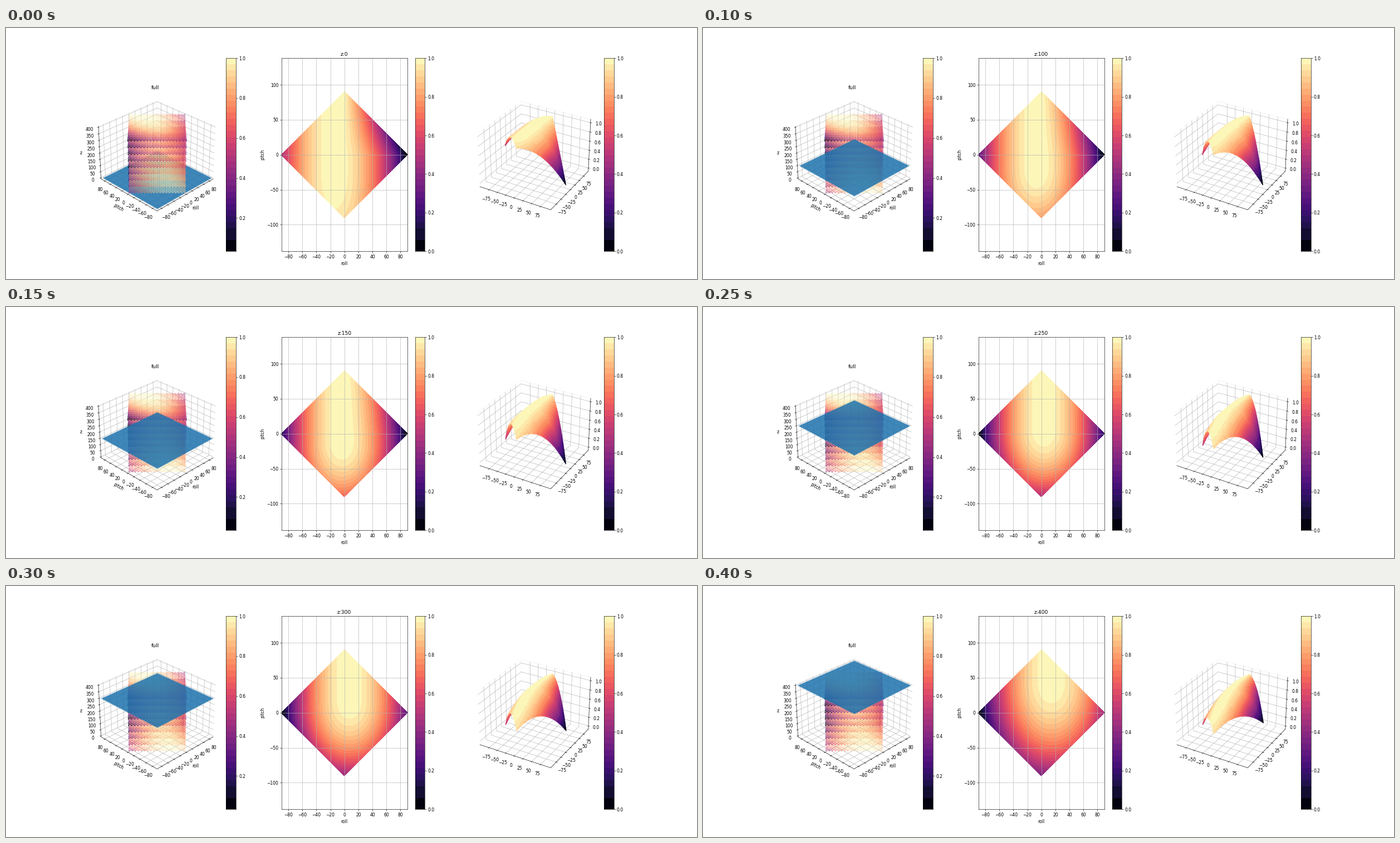
Recreate the animation shown at these times as a matplotlib script. Size 1241 px wide and 451 px high, loop 0.45 s.

```python
import numpy as np
import matplotlib.pyplot as plt
from matplotlib.animation import FuncAnimation
from matplotlib.colors import BoundaryNorm, ListedColormap
from mpl_toolkits.mplot3d.art3d import Poly3DCollection

WIDTH, HEIGHT, DPI = 1241, 451, 55
LIMIT = 90
LEVELS = np.arange(0, 401, 50)
LOWEST = 0.033  # lower end of the first colour scale

# Colour bands: two wide dark ones, then even steps up to 1.
EDGES = np.concatenate([[0, 0.06], np.linspace(0.12, 1, 29)])
BANDS = ListedColormap(plt.get_cmap("magma")((EDGES[:-1] + EDGES[1:]) / 2))


def band_colors(values, low=0.0):
    norm = BoundaryNorm(low + (1 - low) * EDGES, BANDS.N)
    return BANDS(norm(values))


def cost(roll, pitch, z):
    """Distance from the best pose; the optimum drifts as z grows."""
    best_roll = 14.2 * (z - 200) / 200
    best_pitch = -28 + 0.06 * z + 0.0003 * z**2
    drop = np.interp(z, [0, 100, 200, 300, 400], [0.05, 0.195, 0.45, 0.58, 0.67])
    side = (roll - best_roll) / (LIMIT + abs(best_roll))
    below = np.maximum(0, best_pitch - pitch) / (LIMIT + best_pitch)
    twist = 0.18 * max(0, 1 - z / 200)
    corner = np.maximum(0, roll) * np.maximum(0, pitch) / (LIMIT / 2) ** 2
    return side**2 + drop * below**2 + twist * corner


def score(roll, pitch, z):
    worst = max(cost(-LIMIT, 0, z), cost(LIMIT, 0, z))
    return np.clip(1 - cost(roll, pitch, z) / worst, 0, 1)


def diamond(steps):
    a, b = np.meshgrid(steps, steps)
    return LIMIT / 2 * (a + b), LIMIT / 2 * (a - b)


def padded(low, high):
    pad = (high - low) / 48
    return low - pad, high + pad


fig = plt.figure(figsize=(WIDTH / DPI + 1e-9, HEIGHT / DPI + 1e-9), dpi=DPI)

# Three equal cells, each with a plot on the left and a colour bar on the right.
CELL = 0.775 / 3.4
BOTTOM, TALL = 0.11, 0.77


def cell_axes(column, **options):
    left = 0.125 + column * 1.2 * CELL
    return fig.add_axes([left, BOTTOM, 0.8 * CELL, TALL], **options)


def color_bar(column, low):
    left = 0.125 + (column * 1.2 + 0.8493) * CELL
    ax = fig.add_axes([left, BOTTOM, TALL * HEIGHT / 20 / WIDTH, TALL])
    ax.pcolormesh([0, 1], low + (1 - low) * EDGES,
                  np.arange(BANDS.N)[:, None], cmap=BANDS)
    ax.set_ylim(low, 1)
    ax.set_xticks([])
    ax.yaxis.tick_right()
    ax.set_yticks([t for t in np.linspace(0, 1, 6) if t >= low])
    ax.yaxis.set_major_formatter("{x:.1f}")


def whiten_panes(ax):
    for axis in (ax.xaxis, ax.yaxis, ax.zaxis):
        axis.pane.set_facecolor("white")


# Left: all samples with a plane marking the current level.
full = cell_axes(0, projection="3d")
full.view_init(30, -135)
full.set_title("full")
full.set(xlabel="roll", ylabel="pitch", zlabel="z")

axis_steps = np.arange(-LIMIT, LIMIT + 1, 5)
roll3, pitch3, z3 = np.meshgrid(axis_steps, axis_steps, LEVELS, indexing="ij")
inside = abs(roll3) + abs(pitch3) <= LIMIT
roll3, pitch3, z3 = roll3[inside], pitch3[inside], z3[inside]
values = np.empty(len(z3))
for level in LEVELS:
    on = z3 == level
    values[on] = score(roll3[on], pitch3[on], level)
full.scatter(roll3, pitch3, z3, c=band_colors(values, LOWEST), s=4)


def plane_corners(z):
    signs = [(-1, -1), (1, -1), (1, 1), (-1, 1)]
    return [[(LIMIT * i, LIMIT * j, z) for i, j in signs]]


plane = Poly3DCollection(plane_corners(0), facecolors=[(0.12, 0.45, 0.68, 0.86)],
                         edgecolors=[(0.12, 0.45, 0.68, 0.3)], linewidths=3)
full.add_collection3d(plane)
full.set(xlim=padded(-LIMIT, LIMIT), ylim=padded(-LIMIT, LIMIT), zlim=padded(0, 400))
full.set(xticks=np.arange(-80, 81, 20), yticks=np.arange(-80, 81, 20), zticks=LEVELS)
whiten_panes(full)
color_bar(0, LOWEST)

# Middle: the slice at the current level.
section = cell_axes(1)
half_height = LIMIT * TALL * HEIGHT / (0.8 * CELL * WIDTH)
section.set(xlim=(-LIMIT, LIMIT), ylim=(-half_height, half_height),
            xlabel="roll", ylabel="pitch",
            xticks=np.arange(-80, 81, 20), yticks=np.arange(-100, 101, 50))
section.grid(True)
color_bar(1, 0)

# Right: the slice as a surface; its colours stay those of the lowest level.
relief = cell_axes(2, projection="3d")
relief.view_init(30, -60)
reach = 1.1 * LIMIT
relief.set(xlim=padded(-reach, reach), ylim=padded(-reach, reach),
           zlim=padded(-0.05, 1.05))
relief.set(xticks=np.arange(-75, 76, 25), yticks=np.arange(-75, 76, 25),
           zticks=np.linspace(0, 1, 6))
relief.zaxis.set_major_formatter("{x:.1f}")
whiten_panes(relief)
color_bar(2, 0)

fine_roll, fine_pitch = diamond(np.linspace(-1, 1, 121))
knots = np.linspace(-1, 1, 37)
mesh_roll, mesh_pitch = diamond(knots)
face_colors = band_colors(score(*diamond((knots[:-1] + knots[1:]) / 2), 0))
drawn = []


def draw(index):
    z = int(LEVELS[index])
    while drawn:
        drawn.pop().remove()
    plane.set_verts(plane_corners(z))
    section.set_title(f"z:{z}")
    drawn.append(section.contourf(
        fine_roll, fine_pitch, score(fine_roll, fine_pitch, z),
        levels=EDGES, colors=BANDS.colors))
    drawn.append(relief.plot_surface(
        mesh_roll, mesh_pitch, score(mesh_roll, mesh_pitch, z),
        facecolors=face_colors, shade=False, linewidth=1.5))
    return []


animation = FuncAnimation(fig, draw, frames=len(LEVELS), interval=50,
                          init_func=lambda: [], repeat=True, repeat_delay=0)
plt.show()
```
